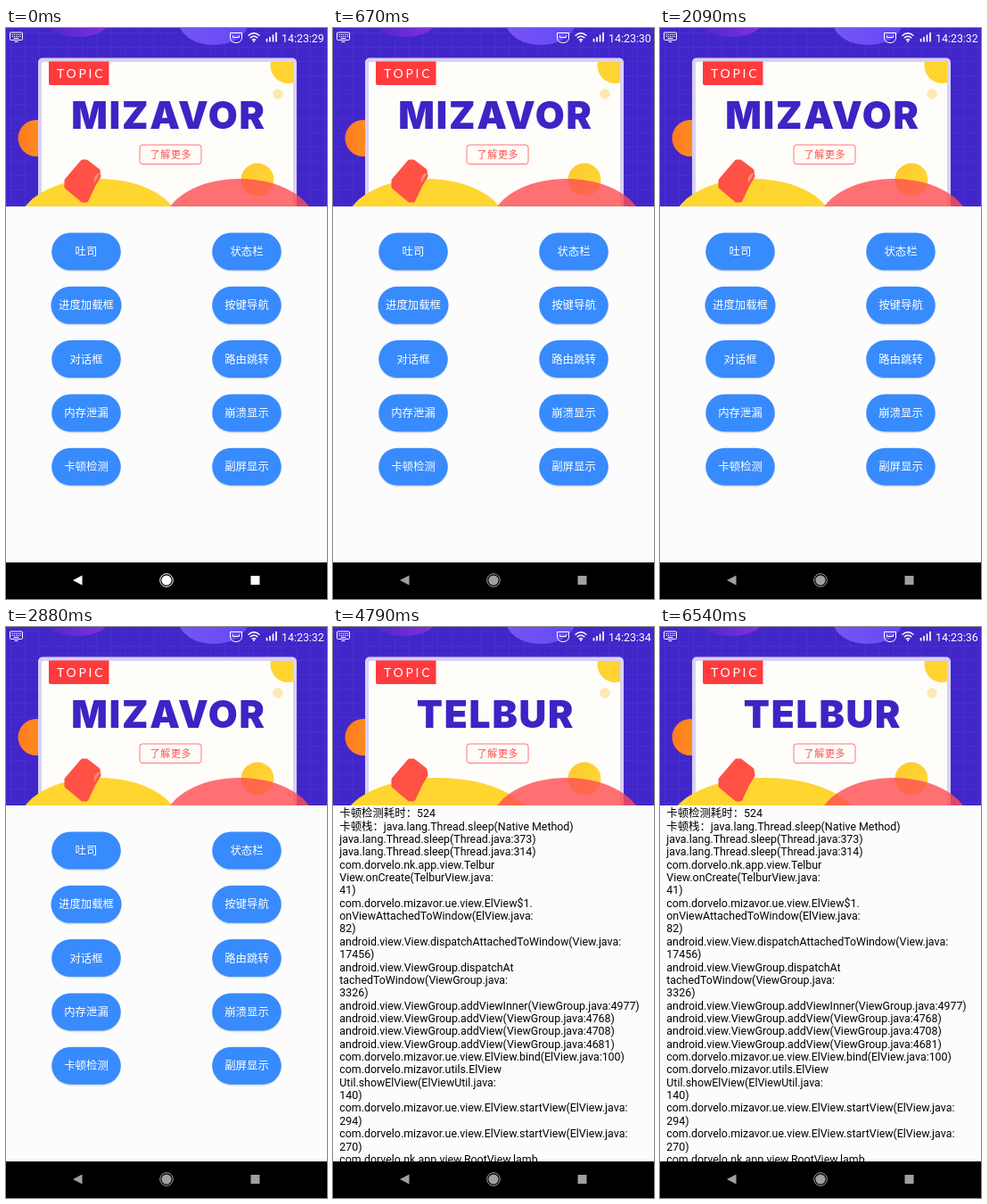
Animation, 360 px wide and 640 px high, one loop 6.64 s. Source, as an HTML page:

```html
<!DOCTYPE html>
<html lang="zh">
<head>
<meta charset="utf-8">
<style>
html, body { margin: 0; width: 100%; height: 100%; overflow: hidden; background: #fcfcfc; }
svg { display: block; font: 12.4px Roboto, 'Noto Sans CJK SC', 'Noto Sans CJK', sans-serif; }
.title { font: 900 42.5px Inter, sans-serif; letter-spacing: 1.8px; fill: #3d24c4; }
.badge { font: 14px Lato, sans-serif; letter-spacing: 2.7px; fill: #fff; }
.more { font: 11px 'Noto Sans CJK SC', 'Noto Sans CJK', sans-serif; letter-spacing: .7px; fill: #ff5148; }
.mid { text-anchor: middle; }
</style>
</head>
<body>
<svg width="360" height="640" viewBox="0 0 360 640">
  <defs>
    <pattern id="grid" width="16" height="16" patternUnits="userSpaceOnUse">
      <path d="M0 5.5H16M5.5 0V16" stroke="#563dd4" stroke-width=".7" opacity=".5"/>
    </pattern>
    <linearGradient id="violet"><stop stop-color="#4a26c9"/><stop offset="1" stop-color="#8530dd"/></linearGradient>
    <linearGradient id="lilac"><stop stop-color="#7655f4"/><stop offset="1" stop-color="#6548f8"/></linearGradient>
    <linearGradient id="orange"><stop stop-color="#ff7a22"/><stop offset="1" stop-color="#ff9a1c"/></linearGradient>
    <linearGradient id="gold" x2="1" y2="1"><stop stop-color="#ffc62c"/><stop offset="1" stop-color="#ffdc38"/></linearGradient>
    <clipPath id="banner"><path d="M0 0H360V200H0z"/></clipPath>
    <clipPath id="card"><path d="M40 38H322V200H40z"/></clipPath>
  </defs>

  <path d="M0 0H360V640H0z" fill="#fcfcfc"/>
  <g clip-path="url(#banner)">
    <path d="M0 0H360V200H0z" fill="#4126c9"/>
    <path d="M0 0H360V200H0z" fill="url(#grid)"/>
    <ellipse cx="80" cy="-7" rx="35" ry="17" fill="url(#violet)"/>
    <ellipse cx="233" cy="-7" rx="39" ry="26" fill="url(#lilac)"/>
    <circle cx="34" cy="123.5" r="20.5" fill="url(#orange)"/>
    <rect x="36" y="33.5" width="290" height="180" rx="5" fill="#d8d0f8"/>
    <rect x="40" y="38" width="282" height="180" rx="2" fill="#fffdfa"/>
    <circle cx="316.5" cy="42" r="20" fill="#ffd430" clip-path="url(#card)"/>
    <circle cx="305" cy="74" r="5.7" fill="#fde9b0"/>
    <path d="M48 37.5H115.5V64H50Q48 64 48 62z" fill="#ff3b3d"/>
    <text class="badge" x="57" y="56">TOPIC</text>
    <rect x="150" y="131" width="69" height="21.5" rx="3" fill="none" stroke="#ff7770"/>
    <text class="more" x="161.5" y="146">了解更多</text>
    <circle cx="282" cy="170" r="18.5" fill="url(#gold)"/>
    <ellipse id="hill" cy="219" ry="50" fill="#ffd52f"/>
    <ellipse cx="262" cy="219" rx="84" ry="50" fill="#ff4e52" opacity=".8"/>
    <path d="M68 171 86 150 90 150 103 160 104 166 98 176 90 193 86 193 68 178z" fill="#ff5145" stroke="#ff5145" stroke-width="5" stroke-linejoin="round"/>
    <path id="fold" d="M99 174Q97 164 106 162z" fill="#ff8c78"/>
    <text id="title" class="title mid" x="182.5" y="113"></text>
  </g>

  <g id="menu"></g>
  <g id="log" fill="#000"></g>

  <g fill="none" stroke="#fff">
    <rect x="4.5" y="5" width="14" height="8.5" rx="1"/>
    <path d="M6.5 7.5H17M6.5 9.5H17" stroke-width="1.2" stroke-dasharray="1.3 1"/>
    <path d="M8.5 11.5H14.5M9.5 15.5H13.5"/>
    <path d="M251.5 5.500H264.500V11Q264 16.500 258 16.500Q252 16.500 251.500 11z"/>
    <path d="M254.500 8.500V10.500H261.500V8.500"/>
    <path d="M271.500 8.700Q278 3 284.500 8.700M273.700 11.200Q278 7.500 282.300 11.200M275.900 13.600Q278 11.800 280.100 13.600" stroke-width="1.400"/>
    <path d="M292.500 12V15.500M296 10V15.500M299.500 7.500V15.500M303 5V15.500" stroke-width="1.700"/>
  </g>
  <circle cx="278" cy="15" r="1" fill="#fff"/>
  <text id="clock" x="309" y="15.5" fill="#fff"></text>

  <path d="M0 599H360V640H0z" fill="#000"/>
  <g id="nav">
    <path d="M75 619 85.500 613.500V624.500z"/>
    <circle cx="180" cy="619" r="5.600"/>
    <circle cx="180" cy="619" r="7.300" fill="none" stroke-width="1"/>
    <path d="M274.500 614H284.500V624H274.500z"/>
  </g>
</svg>
<script>
const LOOP = 6640, SWITCH = 3000;
const $ = id => document.getElementById(id);

const labels = ['吐司', '状态栏', '进度加载框', '按键导航', '对话框', '路由跳转', '内存泄漏', '崩溃显示', '卡顿检测', '副屏显示'];
$('menu').innerHTML = labels.map((label, i) => {
  const x = i % 2 ? 270 : 90, y = 250.5 + 60.3 * (i >> 1);
  const w = label.length > 4 ? 79 : 77.5;
  const pill = (dy, fill) =>
    `<rect x="${x - w / 2}" y="${y - 21 + dy}" width="${w}" height="42" rx="21" fill="${fill}"/>`;
  return pill(2, '#eef0f3') + pill(1, '#d5dbe6') + pill(0, '#388bfd') +
    `<text class="mid" x="${x}" y="${y + 4.6}" fill="#fff">${label}</text>`;
}).join('');

const lines = `卡顿检测耗时：524
卡顿栈：java.lang.Thread.sleep(Native Method)
java.lang.Thread.sleep(Thread.java:373)
java.lang.Thread.sleep(Thread.java:314)
com.dorvelo.nk.app.view.Telbur
View.onCreate(TelburView.java:
41)
com.dorvelo.mizavor.ue.view.ElView$1.
onViewAttachedToWindow(ElView.java:
82)
android.view.View.dispatchAttachedToWindow(View.java:
17456)
android.view.ViewGroup.dispatchAt
tachedToWindow(ViewGroup.java:
3326)
android.view.ViewGroup.addViewInner(ViewGroup.java:4977)
android.view.ViewGroup.addView(ViewGroup.java:4768)
android.view.ViewGroup.addView(ViewGroup.java:4708)
android.view.ViewGroup.addView(ViewGroup.java:4681)
com.dorvelo.mizavor.ue.view.ElView.bind(ElView.java:100)
com.dorvelo.mizavor.utils.ElView
Util.showElView(ElViewUtil.java:
140)
com.dorvelo.mizavor.ue.view.ElView.startView(ElView.java:
294)
com.dorvelo.mizavor.ue.view.ElView.startView(ElView.java:
270)
com.dorvelo.nk.app.view.RootView.lamb`.split('\n');
$('log').innerHTML = lines.map((line, i) =>
  `<text x="7.3" y="${213.2 + 14.36 * i}">${line}</text>`).join('');

function draw() {
  const t = performance.now() % LOOP, onLog = t >= SWITCH;
  $('menu').style.display = onLog ? 'none' : '';
  $('log').style.display = onLog ? '' : 'none';
  $('fold').style.display = onLog ? 'none' : '';
  $('title').textContent = onLog ? 'TELBUR' : 'MIZAVOR';
  $('hill').setAttribute('cx', onLog ? 117 : 104);
  $('hill').setAttribute('rx', onLog ? 105 : 89);
  $('clock').textContent = '14:23:' + (29 + Math.floor((t + 912) / 1000));

  // The navigation keys dim shortly after the start.
  const grey = Math.round(255 - 95 * Math.min(1, t / 650));
  const tone = `rgb(${grey},${grey},${grey})`;
  $('nav').setAttribute('fill', tone);
  $('nav').setAttribute('stroke', tone);
  $('nav').setAttribute('stroke-width', 0);
  requestAnimationFrame(draw);
}
draw();
</script>
</body>
</html>
```
